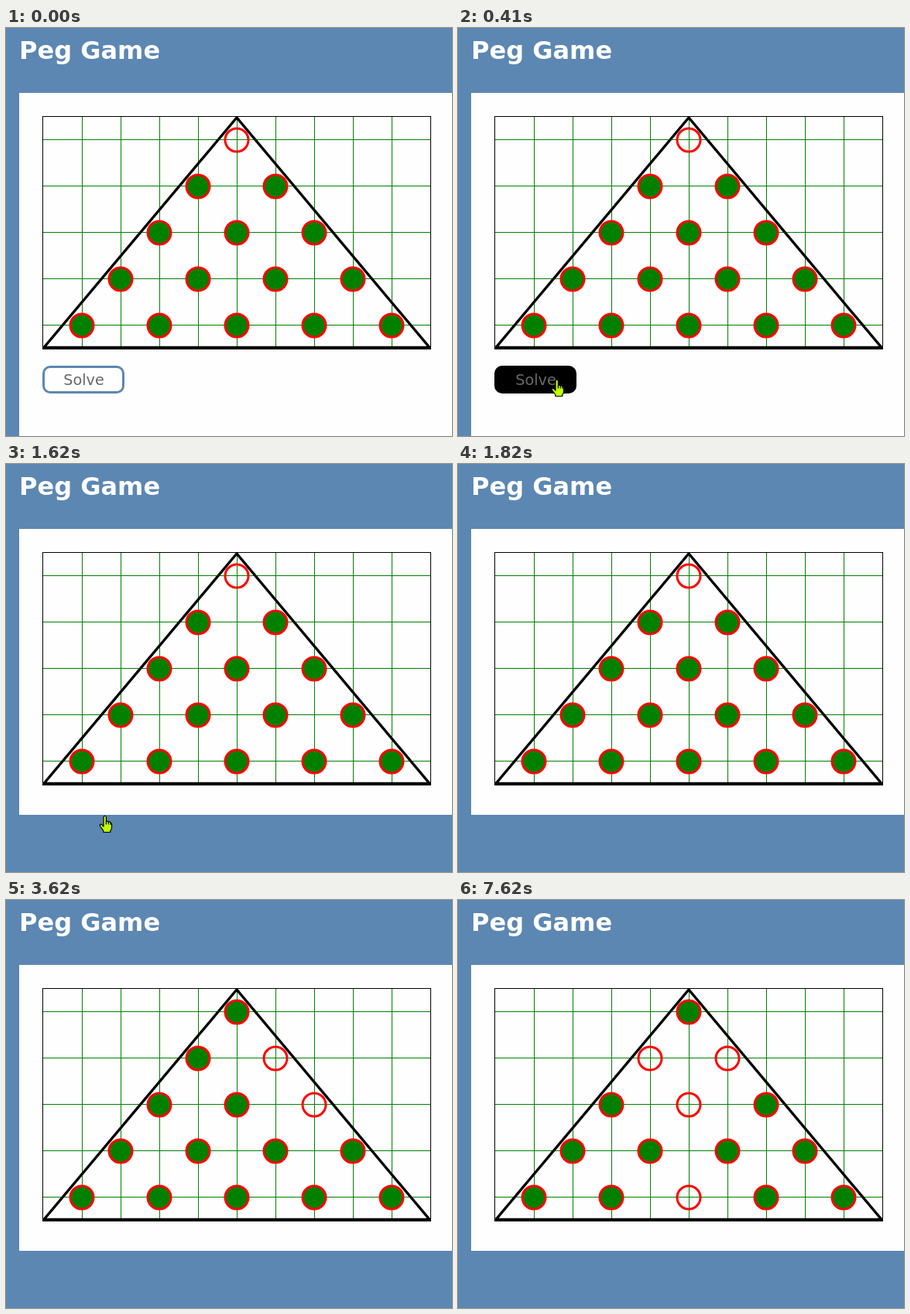
Write an HTML page that moves like this. It is 576 px wide and 528 px high and loops after 8 s.

```html
<!DOCTYPE html>
<html lang="en">
<head>
<meta charset="utf-8">
<title>Peg Game</title>
<style>
html, body { margin: 0; width: 100%; height: 100%; overflow: hidden; background: #5c87b2; }
svg { display: block; width: 576px; height: 528px; font-family: "DejaVu Sans", Verdana, sans-serif; }

.low, .button, .face, .hand, .arrow, .peg { animation: 8s step-end infinite; }
.low, .button { animation-name: collapse; }
.face { animation-name: hover; }
.hand { animation-name: hand; }
.arrow { animation-name: arrow; }
.cursor { animation: move 8s linear infinite; }

.grid { stroke: #008000; stroke-width: 1; shape-rendering: crispEdges; }
.peg { fill: #008000; stroke: #f00; stroke-width: 3; }
.face { fill: #fefefe; stroke: #5c87b2; stroke-width: 3; }

/* peg moves: jumps at 3.62 s, 5.62 s and 7.62 s */
.r0c0 { animation-name: fill1; }
.r1c1 { animation-name: clear1; }
.r2c2 { animation-name: clear1fill2; }
.r3c2 { animation-name: clear2fill3; }
.r4c2 { animation-name: clear2; }
.r1c0, .r2c1 { animation-name: clear3; }

@keyframes fill1 { 0% { fill-opacity: 0; } 45.25%, 100% { fill-opacity: 1; } }
@keyframes clear1 { 0% { fill-opacity: 1; } 45.25%, 100% { fill-opacity: 0; } }
@keyframes clear1fill2 { 0% { fill-opacity: 1; } 45.25% { fill-opacity: 0; } 70.25%, 100% { fill-opacity: 1; } }
@keyframes clear2fill3 { 0% { fill-opacity: 1; } 70.25% { fill-opacity: 0; } 95.25%, 100% { fill-opacity: 1; } }
@keyframes clear2 { 0% { fill-opacity: 1; } 70.25%, 100% { fill-opacity: 0; } }
@keyframes clear3 { 0% { fill-opacity: 1; } 95.25%, 100% { fill-opacity: 0; } }

@keyframes collapse { 0% { opacity: 1; } 20.25%, 100% { opacity: 0; } }
@keyframes hover { 0% { fill: #fefefe; stroke: #5c87b2; } 3.55%, 100% { fill: #000; stroke: #000; } }
@keyframes hand { 0% { opacity: 0; } 3.55% { opacity: 1; } 21.5%, 100% { opacity: 0; } }
@keyframes arrow {
  0% { opacity: 0; }
  1.625% { opacity: 1; }
  3.55% { opacity: 0; }
  21.5% { opacity: 1; }
  22.75%, 100% { opacity: 0; }
}
@keyframes move {
  0%, 1.625% { transform: translate(172px, 518px); animation-timing-function: ease-out; }
  5.125%, 21.4% { transform: translate(127px, 456px); }
  21.5% { transform: translate(128px, 472px); }
  22.75%, 100% { transform: translate(133px, 530px); }
}
</style>
</head>
<body>
<svg viewBox="0 0 576 528">
  <rect width="576" height="528" fill="#5c87b2"/>
  <text x="17" y="40" font-size="32" font-weight="700" fill="#fff">Peg Game</text>
  <rect x="17" y="84" width="559" height="370" fill="#fefefe"/>
  <rect class="low" x="17" y="454" width="559" height="74" fill="#fefefe"/>

  <clipPath id="board"><rect x="48" y="115" width="500" height="300"/></clipPath>
  <g class="grid" id="grid"></g>
  <path d="M298 116L49 413.5H547Z" fill="none" stroke="#000" stroke-width="3.4" clip-path="url(#board)"/>
  <g id="pegs"></g>
  <rect x="47.5" y="114.5" width="501" height="301" fill="none" stroke="#000"/>

  <g class="button">
    <rect class="face" x="48.5" y="438.5" width="103" height="33" rx="8.5"/>
    <text x="100.5" y="462" font-size="19.2" text-anchor="middle" fill="#696969">Solve</text>
  </g>

  <g class="cursor" fill="#bfff00" stroke="#000" stroke-width="1.2" stroke-linejoin="round">
    <path class="arrow" d="M0 0V16L3.8 12.5L6.4 18.5L9 17.4L6.4 11.5H11.5Z"/>
    <g class="hand">
      <path d="M-1 13V1Q-1-.5.7-.5T2.4 1V6.5Q4 5.5 5.2 7.2Q7 6.4 8 8Q9.5 8 9.5 10V14.5Q9.5 17 7.8 18.5V20.5H-1.2V18.5L-5.6 12.5Q-6 10-4 10Z"/>
      <path d="M2.4 6.5V10.5M5.2 7.2V10.5M8 8V11" fill="none"/>
    </g>
  </g>
</svg>
<script>
const add = (parent, tag, attrs) => {
  const el = document.createElementNS("http://www.w3.org/2000/svg", tag);
  for (const key in attrs) el.setAttribute(key, attrs[key]);
  parent.append(el);
};
const grid = document.getElementById("grid");
const pegs = document.getElementById("pegs");

for (let x = 98.5; x < 548; x += 50) add(grid, "line", { x1: x, x2: x, y1: 115, y2: 415 });
for (let row = 0; row < 5; row++) {
  const y = 145 + row * 60;
  add(grid, "line", { x1: 48, x2: 548, y1: y - 0.5, y2: y - 0.5 });
  for (let col = 0; col <= row; col++) {
    add(pegs, "circle", { class: `peg r${row}c${col}`, cx: 298 + col * 100 - row * 50, cy: y, r: 15 });
  }
}
</script>
</body>
</html>
```
